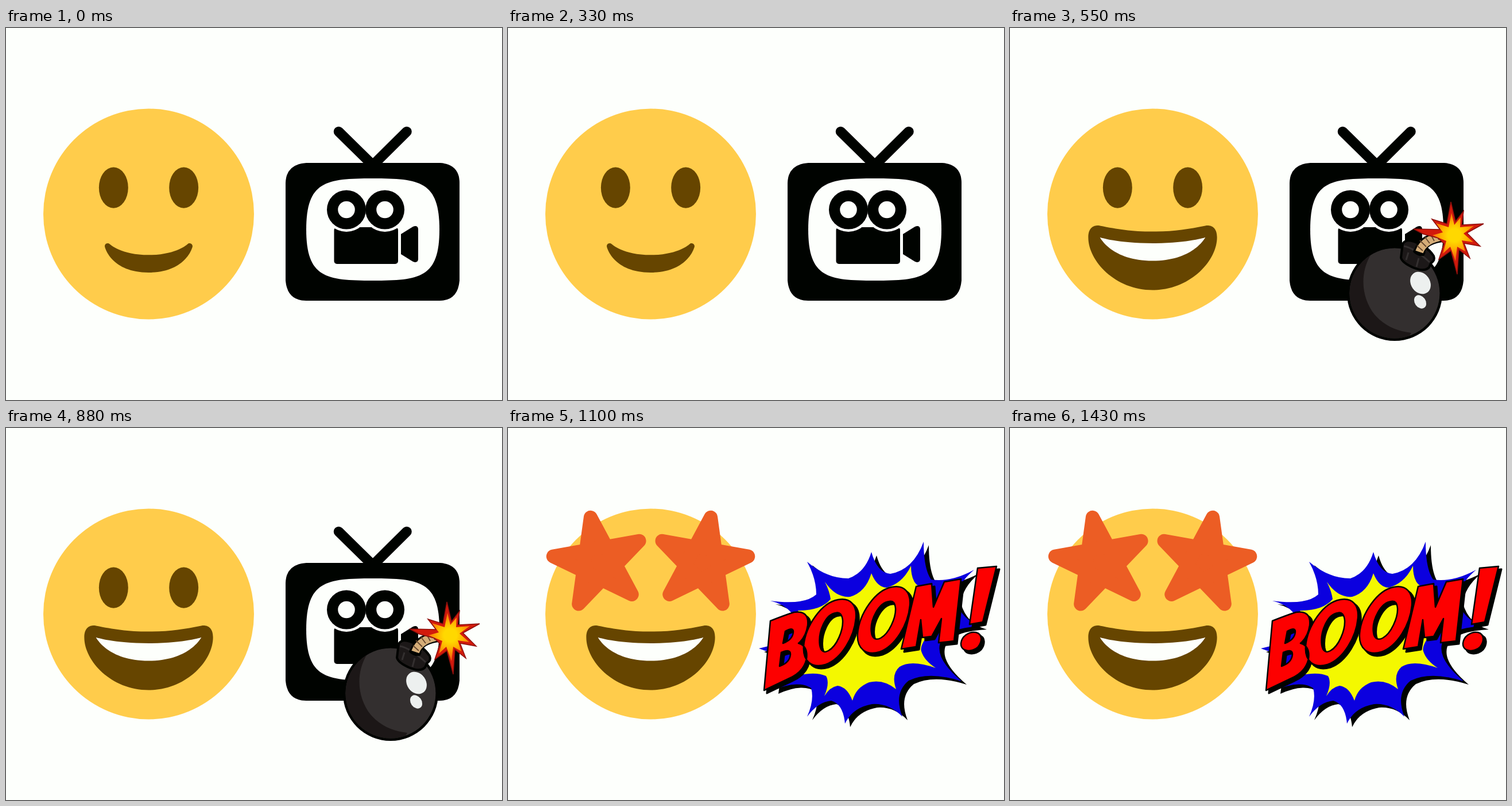
An HTML page that plays this animation: 864x648 px, repeating every 1650 ms.

```html
<!DOCTYPE html>
<html lang="en">
<head>
<meta charset="utf-8">
<title>Smile, bomb, boom</title>
<style>
  html, body { margin: 0; width: 100%; height: 100%; overflow: hidden; background: #fdfffc; }
  svg { display: block; width: 100vw; height: 100vh; }
  [data-steps] { visibility: hidden; }
  .paper { fill: #fdfffc; }
  .ink { fill: #000300; }
  .line { stroke: #000300; stroke-linejoin: round; stroke-linecap: round; }
</style>
</head>
<body>
<svg viewBox="0 0 864 648">
  <defs>
    <radialGradient id="fire" gradientUnits="userSpaceOnUse" cx="774" cy="361" r="38">
      <stop offset=".3" stop-color="#ffd800"/>
      <stop offset=".6" stop-color="#ffb400"/>
      <stop offset="1" stop-color="#f8700a"/>
    </radialGradient>
    <clipPath id="ball"><circle cx="670" cy="462" r="78.5"/></clipPath>
    <path id="burst" d="M457 301Q516 309 537 290Q537 262 521 233Q555 262 593 262Q622 252 633 216Q643 252 666 254Q706 247 724 198Q724 245 737 264Q772 269 812 247Q782 272 780 300Q790 335 825 345Q770 348 756 368Q738 397 790 441Q733 423 698 440Q671 462 687 503Q664 479 634 481Q600 487 587 515Q584 481 563 475Q540 477 521 503Q534 474 528 453Q503 438 462 457L470 396L437 384L478 374Q500 340 494 322Q480 306 457 301Z"/>
    <path id="letters" fill-rule="evenodd" d="
      M457 336Q482 326 498 321Q525 317 522 344Q519 364 506 375Q523 380 520 402Q515 425 490 436L446 457Z
      M483 354L479 375Q496 369 497 355Q497 346 483 354Z M476 391L473 415Q491 409 492 394Q492 384 476 391Z
      M575 299C596 295 608 308 606 331C603 364 581 402 553 412C529 419 513 406 515 380C518 345 546 304 575 299Z
      M571 322C553 324 540 355 543 378C545 390 551 392 558 388C573 380 584 352 583 335C582 325 578 320 571 322Z
      M669 277C690 273 702 286 700 309C697 342 675 380 647 390C623 397 607 384 609 358C612 323 640 282 669 277Z
      M664 302C646 304 630 334 633 356C634 367 641 370 649 366C664 358 676 330 675 314C674 304 671 301 664 302Z
      M711 276L738 271L741 312L760 268L789 263L777 371L750 374L755 332L738 363L722 365L719 334L711 381L685 385Z
      M818 244L851 241L827 338L804 342Z
      M789 375C790 363 803 354 815 356C827 359 826 372 819 381C810 391 788 391 789 375Z"/>
  </defs>

  <g transform="translate(65 140.5) scale(10.194)" fill="#664500">
    <circle cx="18" cy="18" r="18" fill="#ffcc4b"/>
    <g data-steps="01">
      <ellipse cx="12" cy="13.5" rx="2.5" ry="3.5"/>
      <ellipse cx="24" cy="13.5" rx="2.5" ry="3.5"/>
    </g>
    <path data-steps="0" d="M10.515 23.621C10.56 23.8 11.683 28 18 28c6.318 0 7.44-4.2 7.485-4.379.055-.217-.043-.442-.237-.554-.195-.111-.439-.078-.6.077C24.629 23.163 22.694 25 18 25s-6.63-1.837-6.648-1.855C11.256 23.05 11.128 23 11 23c-.084 0-.169.021-.246.064-.196.112-.294.339-.239.557z"/>
    <g data-steps="12">
      <path d="M18 21c-3.623 0-6.027-.422-9-1-.679-.131-2 0-2 2 0 4 4.595 9 11 9 6.404 0 11-5 11-9 0-2-1.321-2.131-2-2-2.973.578-5.377 1-9 1z"/>
      <path class="paper" d="M9 22s3 1 9 1 9-1 9-1-2 4-9 4-9-4-9-4z"/>
    </g>
  </g>

  <g data-steps="2" fill="#ec5d24" stroke="#ec5d24" stroke-width="24" stroke-linejoin="round">
    <polygon class="star" transform="translate(158 234.5) rotate(-10.2)"/>
    <polygon class="star" transform="translate(339 234.5) rotate(10.2)"/>
  </g>

  <g data-steps="01" class="ink">
    <path class="line" d="M579.5 180.5L639 239L698 180.5" fill="none" stroke-width="17.5"/>
    <path d="M523 235H756Q790 237 790 270V440Q787 475 755 475H523Q490 475 487 440V270Q488 237 523 235Z"/>
    <path class="paper" d="M639 262C721 262 755 267 755 351S721 440 639 440S523 435 523 351S557 262 639 262Z"/>
    <rect x="571.5" y="347" width="111.5" height="64" rx="5"/>
    <g class="paper"><circle cx="593" cy="316.5" r="38.5"/><circle cx="660" cy="316.5" r="38.5"/></g>
    <circle cx="593" cy="316.5" r="34"/><circle cx="660" cy="316.5" r="34"/>
    <g class="paper"><circle cx="593" cy="316.5" r="14.8"/><circle cx="660" cy="316.5" r="14.8"/></g>
    <path d="M688 359L709 346Q717 343 718 350V403Q717 410 709 407L688 394Z"/>
  </g>

  <g data-steps="1">
    <circle class="ink" cx="670" cy="462" r="83"/>
    <g clip-path="url(#ball)">
      <circle cx="670" cy="462" r="79" fill="#332f2f"/>
      <path fill="#1c1717" d="M629 394C607 430 614 473 635 499C652 519 674 528 699 531L680 560H570V390Z"/>
    </g>
    <g fill="#edf0ef">
      <ellipse cx="715" cy="444" rx="16.5" ry="20.5" transform="rotate(-35 715 444)"/>
      <ellipse cx="714.5" cy="477" rx="9.5" ry="12.5" transform="rotate(-35 714.5 477)"/>
    </g>
    <path class="line" fill="#1c1818" stroke-width="4" d="M684 376Q689 367 704 372Q726 379 738 397Q741 405 733 410L730 417Q722 425 704 418Q683 409 681 400Z"/>
    <path fill="none" stroke="#332f2f" stroke-width="3" d="M686 380Q704 383 731 408M694 391L690 404M712 401L708 416"/>
    <path class="ink" d="M703 386Q713 378 724 391L721 397Q709 398 702 390Z"/>
    <g fill="none">
      <path class="line" stroke-width="19" d="M714 387Q721 367 756 363"/>
      <path stroke="#d5ad78" stroke-width="14" d="M713 390Q721 367 756 363"/>
      <path stroke="#65472e" stroke-width="1.8" d="M709 379L719 388M714 370L725 381M722 363L731 375M732 358L739 371M742 356L747 369"/>
    </g>
    <path fill="#d21a0c" stroke="#8d100c" stroke-width="1.5" d="M768 303L776 337L790 319L787 343L825 341L796 357L819 380L791 375L801 401L782 386L779 429L768 388L747 403L756 376L746 366L720 359L703 350L749 351L735 333L761 341Z"/>
    <path fill="url(#fire)" d="M769 322L774 343L785 330L784 347L808 345L790 358L807 373L787 370L793 389L779 381L776 406L767 381L754 393L760 371L736 361L754 356L742 340L764 347Z"/>
  </g>

  <g data-steps="2" role="img" aria-label="BOOM!">
    <use href="#burst" x="9" y="6" class="ink"/>
    <use href="#burst" fill="#0b00df"/>
    <path fill="#f4f800" d="M505 318Q546 318 562 298Q560 284 552 268Q571 296 596 294Q623 286 633 253Q643 278 660 278Q688 270 702 240Q702 268 716 276L740 350Q716 378 720 389Q725 405 745 418Q702 403 682 416Q667 429 676 455Q654 437 629 443Q606 452 600 475Q591 451 574 449Q561 451 551 467Q561 444 554 432Q536 424 505 431L520 350Z"/>
    <use href="#letters" x="5" y="5" class="ink line" stroke-width="3"/>
    <use href="#letters" fill="#fd0000" class="line" stroke-width="2.5"/>
  </g>
</svg>
<script>
const STEP = 550, STEPS = 3;
const parts = document.querySelectorAll("[data-steps]");

const tips = Array.from({ length: 5 }, (_, i) => {
  const angle = i * 0.8 * Math.PI;
  return [80 * Math.sin(angle), -80 * Math.cos(angle)];
});
document.querySelectorAll(".star").forEach(star => star.setAttribute("points", tips.join(" ")));

function draw() {
  const step = Math.floor(performance.now() / STEP) % STEPS;
  for (const part of parts)
    part.style.visibility = part.dataset.steps.includes(step) ? "visible" : "hidden";
  requestAnimationFrame(draw);
}
draw();
</script>
</body>
</html>
```
